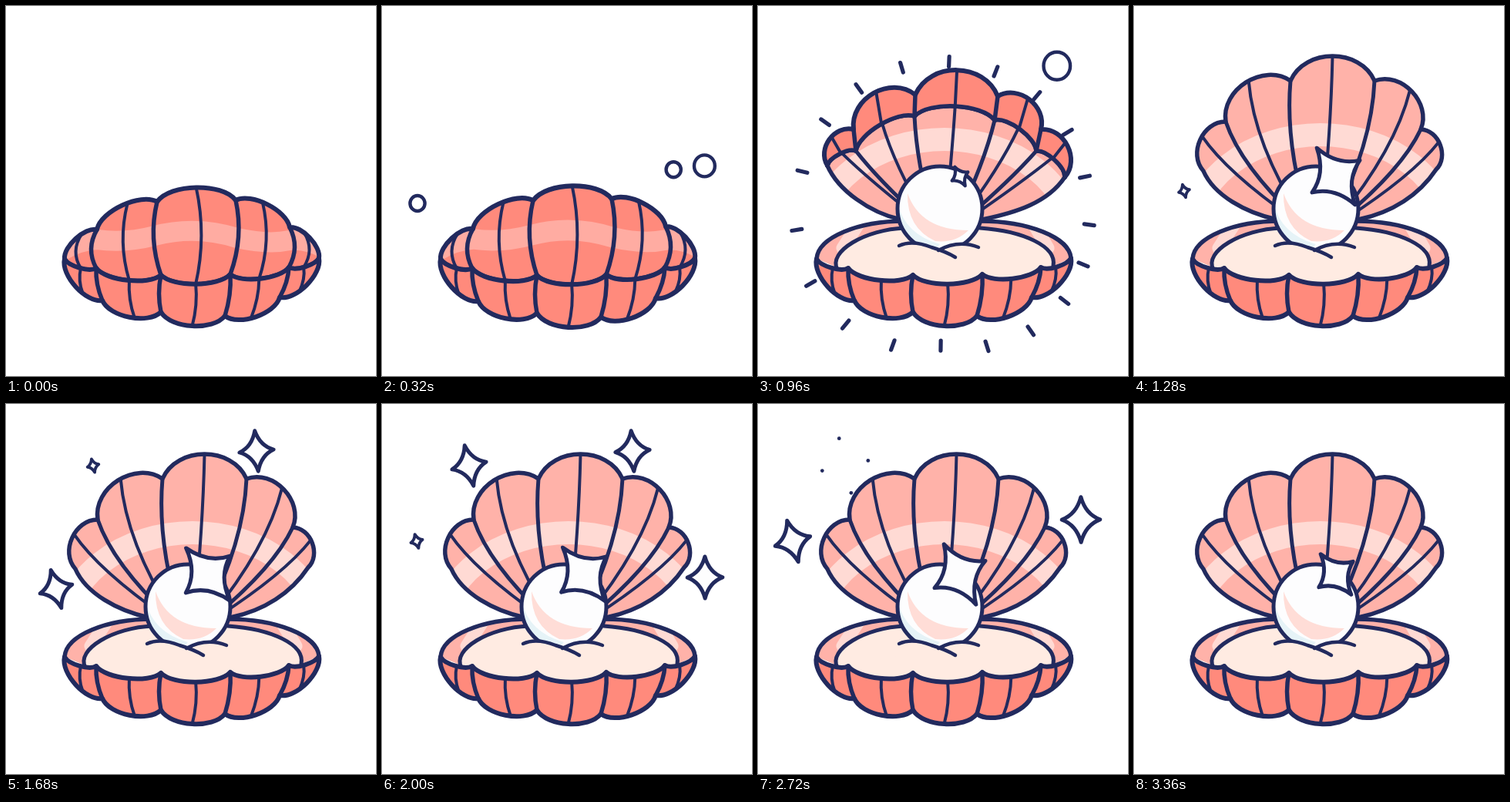
Write an HTML page with a canvas that moves like this. It is 480x480 px and loops after 3.44 s.

```html
<!DOCTYPE html>
<html lang="en">
<head>
<meta charset="utf-8">
<title>Pearl shell</title>
<style>
  html, body { margin: 0; width: 100%; height: 100%; overflow: hidden; background: #fff; }
  canvas { display: block; width: 480px; height: 480px; }
</style>
</head>
<body>
<canvas id="stage" width="480" height="480"></canvas>
<script>
const ctx = document.getElementById('stage').getContext('2d');
const LOOP = 3440, STEP = 80, TAU = 2 * Math.PI;
const NAVY = '#222a5e', CORAL = '#ff8a7c', CORAL_LIGHT = '#ffaca2',
      PINK = '#ffb2a9', PINK_LIGHT = '#ffdad4', FLESH = '#ffebe2', WHITE = '#fdfdfe';

// A scalloped edge: how far its five lobes puff out, then the six points between them.
const RIM = [-.18, 76,328, 117,340, 201,349, 291,348, 367,339, 406,327];
const BASE = [-.25, 76,328, 125,382, 201,397, 284,402, 355,378, 406,327];
const CROWN_SHUT = [.23, 76,328, 118,290, 196,254, 298,252, 368,287, 406,327];
const CROWN_HALF = [.41, 90,207, 124,160, 204,115, 311,117, 367,160, 398,222];
const LIP_HALF = [.2, 90,207, 127,188, 203,143, 307,148, 361,188, 398,222];
const WIDE = [.39, 90,214, 119,150, 203,97, 312,97, 372,160, 392,212];

// Each bubble ends with a pop at x, y
const BUBBLES = [
  { x: 422, y: 157, r: 17, born: 80, pop: 560 },
  { x: 389, y: 61, r: 19, born: 240, pop: 1040 },
  { x: 52, y: 172, r: 15, born: 160, pop: 720 }];
const STARS = [
  { x: 65, y: 240, born: 1200, burst: 1760 },
  { x: 325, y: 61, born: 1440, burst: 2240 },
  { x: 113, y: 80, born: 1600, burst: 2640 },
  { x: 419, y: 225, born: 1680, burst: 2400 },
  { x: 45, y: 178, born: 1920, burst: 2960 },
  { x: 419, y: 150, born: 2400, burst: 2960 }];

const clamp = u => Math.min(1, Math.max(0, u));
const rad = deg => deg * Math.PI / 180;
const mix = (a, b, u) => a + (b - a) * u;
const mixAll = (a, b, u) => a.map((v, i) => mix(v, b[i], u));
const morph = (shut, half, wide, k) => k < 1 ? mixAll(shut, half, k) : mixAll(half, wide, k - 1);

const node = (edge, i) => edge.slice(1 + i * 2, 3 + i * 2);

// Cubic of one lobe, its handles pushed out square to the chord
function lobe(edge, i) {
  const [ax, ay] = node(edge, i), [bx, by] = node(edge, i + 1);
  const dx = bx - ax, dy = by - ay, inset = .17;
  const nx = dy * edge[0], ny = -dx * edge[0];
  return [ax, ay, ax + dx * inset + nx, ay + dy * inset + ny,
    bx - dx * inset + nx, by - dy * inset + ny, bx, by];
}

function onLobe(edge, i, t) {
  const p = lobe(edge, i), u = 1 - t;
  const axis = j => u*u*u*p[j] + 3*u*u*t*p[j + 2] + 3*u*t*t*p[j + 4] + t*t*t*p[j + 6];
  return [axis(0), axis(1)];
}

function chain(edge) {
  let d = `${node(edge, 0)}`;
  for (let i = 0; i < 5; i++) d += `C${lobe(edge, i).slice(2)}`;
  return d;
}

function chainBack(edge) {
  let d = `${node(edge, 5)}`;
  for (let i = 4; i >= 0; i--) {
    const p = lobe(edge, i);
    d += `C${p[4]},${p[5]} ${p[2]},${p[3]} ${p[0]},${p[1]}`;
  }
  return d;
}

function fill(d, color) {
  ctx.fillStyle = color;
  ctx.fill(new Path2D(d));
}

function line(d, width, color = NAVY) {
  ctx.strokeStyle = color;
  ctx.lineWidth = width;
  ctx.stroke(new Path2D(d));
}

function clipped(d, draw) {
  ctx.save();
  ctx.clip(new Path2D(d));
  draw();
  ctx.restore();
}

// Seams and ribs between two edges, bowed away from the middle
function folds(top, bottom, bulge, topLean, bottomLean) {
  const fold = (a, b, width) => {
    const bow = a[0] < 230 ? -bulge : bulge;
    line(`M${a}Q${(a[0] + b[0]) / 2 + bow},${(a[1] + b[1]) / 2} ${b}`, width);
  };
  for (let i = 0; i < 5; i++) {
    fold(onLobe(top, i, .5 + topLean * (2 - i)), onLobe(bottom, i, .5 + bottomLean * (2 - i)), 4);
    if (i) fold(node(top, i), node(bottom, i), 5.5);
  }
}

function lidInside(lip, k) {
  const [lx, ly] = node(lip, 0), [rx, ry] = node(lip, 5);
  const body = `M${chain(lip)}C${rx - 22},${ry + 33} 335,268 291,277L185,277C145,268 ${lx + 14},${ly + 32} ${lx},${ly}Z`;
  fill(body, PINK);
  clipped(body, () => {
    const y = 300 + (2 - k) * 6;
    line(`M74,${y}A168,133 0 0 1 410,${y}`, 30, PINK_LIGHT);
    // Folds gather at the hinge behind the pearl
    const gather = ([x, y], width) => {
      const side = Math.tanh((x - 248) / 60), end = 240 + 16 * side;
      line(`M${x},${y}Q${(x + end) / 2 + 16.5 * k * side},${(y + 288) / 2 - 8} ${end},288`, width);
    };
    for (let i = 0; i < 5; i++) {
      gather(onLobe(lip, i, .5 + .03 * (2 - i)), 4);
      if (i) gather(node(lip, i), 5);
    }
  });
  line(body, 5.5);
}

function lidOutside(crown, lip, k) {
  const shut = clamp(1 - k);
  const body = `M${chain(crown)}L${chainBack(lip)}Z`;
  fill(body, CORAL);
  clipped(body, () => {
    ctx.globalAlpha = shut;
    ctx.translate(0, -160 * k);
    line('M72,318Q95,304 118,303Q155,308 193,298Q246,284 300,301Q340,310 368,304Q390,302 412,314', 26, CORAL_LIGHT);
  });
  folds(crown, lip, 14 * shut, .03 + .04 * shut, .02);
  line(`M${chain(crown)}`, 6);
  line(`M${chain(lip)}`, 5.5);
}

function bowl() {
  const body = 'M76,328C78,300 130,279 190,279L291,279C350,279 404,300 406,327L367,345L117,345Z';
  fill(body, PINK);
  clipped(body, () => line('M132,280L110,314M356,280L376,314', 17, PINK_LIGHT));
  line('M76,328C78,300 130,279 190,279M288,279C350,279 404,300 406,327', 5.5);
  fill('M103,342C90,318 140,290 190,288L291,288C345,292 388,312 383,337L383,345L292,365L150,370L103,355Z', FLESH);
  line('M103,342C90,318 140,290 190,288M288,288C345,292 388,312 383,337', 5);
}

function pearl(drop) {
  ctx.save();
  ctx.translate(0, drop);
  const ball = 'M181,263a55,55 0 1 1 110,0a55,55 0 1 1 -110,0Z';
  fill(ball, WHITE);
  clipped(ball, () => {
    fill('M181,255Q190,296 236,309L225,322L178,300Z', '#e6f3f7');
    fill('M194,243Q211,291 273,291Q256,308 230,305Q193,288 194,243Z', '#ffddd7');
  });
  line(ball, 5);
  ctx.restore();
  fill('M183,311Q203,304 225,312L236,317Q260,304 286,313L294,335L176,335Z', FLESH);
  line('M183,311Q200,303 225,313Q245,319 256,326M234,317Q260,303 286,313', 4.5);
}

function lowerFront() {
  const body = `M${chain(RIM)}L${chainBack(BASE)}Z`;
  fill(body, CORAL);
  folds(RIM, BASE, 5, .02, .07);
  line(body, 6);
}

// Tips of a four-pointed star, from the top clockwise
function starTips(x, y, size, tilt) {
  return [0, 1, 2, 3].map(i => {
    const a = rad(tilt + (i - 1) * 90), r = size * (i % 2 ? 21.5 : 25.5);
    return [x + r * Math.cos(a), y + r * Math.sin(a)];
  });
}

function sparkle(x, y, size, tilt) {
  const tips = starTips(x, y, size, tilt), pinch = .52;
  let d = `M${tips[0]}`;
  tips.forEach((a, i) => {
    const b = tips[(i + 1) % 4];
    d += `Q${mix((a[0] + b[0]) / 2, x, pinch)},${mix((a[1] + b[1]) / 2, y, pinch)} ${b}`;
  });
  fill(d + 'Z', WHITE);
  line(d + 'Z', mix(3.2, 5, clamp(size)));
}

function glint(t) {
  if (t < 960) return;
  const size = mix(.55, 1.74, clamp((t - 960) / 240)) - .45 * clamp((t - 2720) / 640);
  sparkle(262, 221, size, -34 + 6 * Math.sin((t - 2240) / 1920 * TAU));
}

function star({ x, y, born, burst }, t) {
  const age = t - born, gone = t - burst;
  if (age <= 0 || gone > 160) return;
  const tilt = x / 25 - 17 + 3 * Math.sin((t - 2000) / 720 * TAU);
  const full = 1 + (born - 1200) / 8000;
  if (gone < 0) {
    sparkle(x, y, full * clamp(age / 240), tilt);
  } else {
    starTips(x, y, full * (1.1 + gone / 320), tilt).forEach(p => line(`M${p}l.1,0`, 6 - gone / 60));
  }
}

function bubble({ x, y, r, born, pop }, t) {
  const left = pop - t;
  if (t < born || left < -160) return;
  if (left > 0) {
    const size = r - left * .0125;
    ctx.beginPath();
    ctx.ellipse(x - left * .015, y + left * .21, size * .96, size, 0, 0, TAU);
    ctx.fillStyle = '#fff';
    ctx.fill();
    ctx.strokeStyle = NAVY;
    ctx.lineWidth = 4.4;
    ctx.stroke();
    return;
  }
  const inner = 17 - left * .035, length = 5 + left * .022;
  for (let i = 0; i < 7; i++) {
    const a = rad(-112 + 52 * i), c = Math.cos(a), s = Math.sin(a);
    line(`M${x + inner * c},${y + inner * s}l${length * c},${length * s}`, 4.4);
  }
}

function rays(t) {
  if (t < 880 || t > 1200) return;
  const out = (t - 960) * .08, half = 6.5 - Math.abs(t - 960) * .018;
  for (let i = 0; i < 19; i++) {
    // Below the shell the ring is a little squarer and turned back
    const even = -87.6 + i * 360 / 19;
    const a = rad(even - 11 * Math.sqrt(Math.max(0, Math.sin(rad(even - 20)))));
    const c = Math.cos(a), s = Math.sin(a), low = Math.max(0, s);
    const r = 188 + low * (34 * Math.abs(c) - 8) + out - half;
    line(`M${240 + r * c},${260 + r * s}l${half * 2 * c},${half * 2 * s}`, 5.2);
  }
}

// 0 is shut, 1 half open, 2 wide open
const openness = t => 2 * clamp((t - 640) / 480) ** 1.71;

function draw(t) {
  ctx.fillStyle = '#fff';
  ctx.fillRect(0, 0, 480, 480);
  ctx.lineCap = ctx.lineJoin = 'round';
  const k = openness(t);
  const crown = morph(CROWN_SHUT, CROWN_HALF, WIDE, k);
  const lip = morph(RIM, LIP_HALF, WIDE, k);
  const squash = 1 + .03 * Math.sin(clamp(t / 640) * 1.5 * Math.PI) * clamp(1 - k);

  ctx.save();
  ctx.translate(0, 330 * (1 - squash));
  ctx.scale(1, squash);
  if (k > 0) {
    lidInside(lip, k);
    bowl();
    pearl(clamp(1 - k) * 50);
  }
  if (k < 2) lidOutside(crown, lip, k);
  lowerFront();
  ctx.restore();

  glint(t);
  rays(t);
  STARS.forEach(s => star(s, t));
  BUBBLES.forEach(b => bubble(b, t));
}

const start = performance.now();
function tick() {
  const t = (performance.now() - start) % LOOP;
  draw(Math.floor(t / STEP) * STEP);
  requestAnimationFrame(tick);
}
tick();
</script>
</body>
</html>
```
